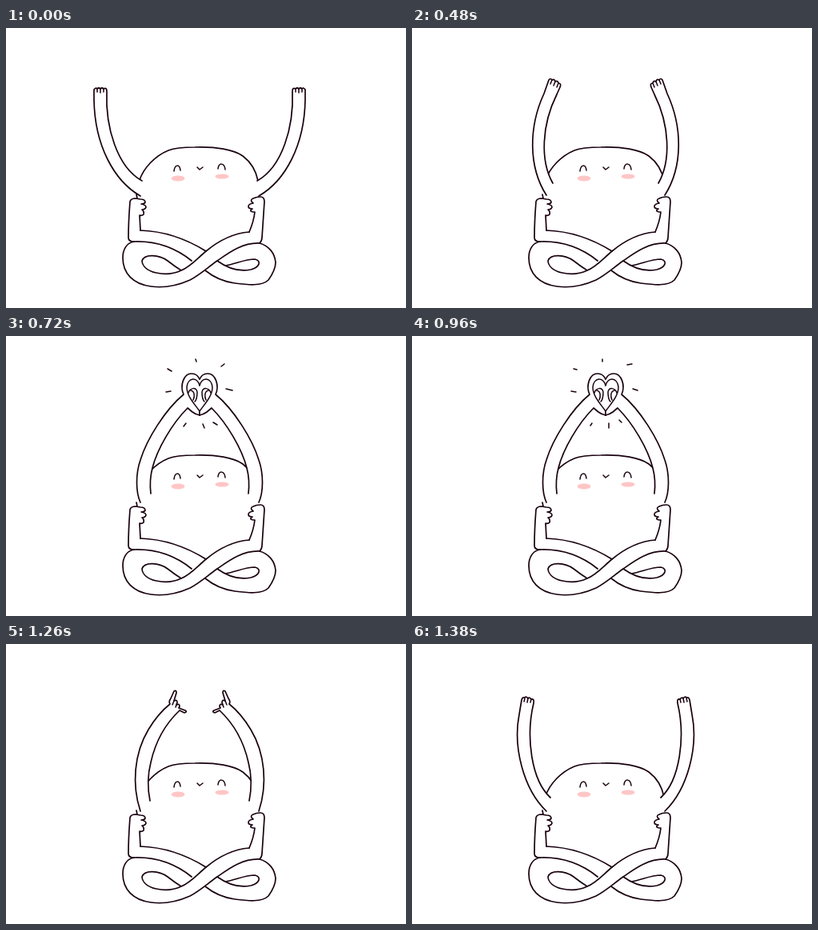
Animation, 500 px wide and 350 px high, one loop 1440 ms. Source, as an HTML page:

```html
<!DOCTYPE html>
<html lang="en">
<head>
<meta charset="utf-8">
<title>Stretch</title>
<style>
  html, body { margin: 0; width: 100%; height: 100%; overflow: hidden; background: #fff; }
  svg { display: block; width: 500px; height: 350px; }
  path { fill: none; stroke: #19000f; stroke-width: 1.7; stroke-linecap: round; stroke-linejoin: round; }
  .skin { fill: #fff; stroke: none; }
  .fine { stroke-width: 1.5; }
  .cheek { fill: #ffc6c6; }
</style>
</head>
<body>
<svg viewBox="0 0 500 350">
  <path d="M167 190C172 175 186 160 203 153C213 149 226 149 236 149C262 148 285 152 296 160C308 169 313 181 315 191"/>
  <ellipse class="cheek" cx="215" cy="188" rx="8.5" ry="3.5"/>
  <ellipse class="cheek" cx="270" cy="185.5" rx="8.5" ry="3.1"/>
  <path class="fine" d="M210 179C211 170 217 170 218 178M265 176C266 168 273 168 274 177M239 174L242 177L246 174"/>

  <g id="arms"></g>
  <path id="rays" class="fine"/>

  <!-- feet -->
  <path d="M160 267Q153 267 153 262C153 246 154 230 155 217Q156 213 162 213L168 214Q174 214 174 218Q173 220 169 220Q175 221 175 224Q174 227 170 227Q173 229 172 233Q170 235 167 234L168 253M163 208L164 213"/>
  <path d="M317 269Q320 266 320 262L323 217Q323 211 318 211Q313 211 309 213Q304 215 309 219Q303 220 303 223Q303 226 308 226Q303 229 309 230H311C310 239 307 248 304 255"/>

  <!-- crossed legs -->
  <path d="M168 253C200 254 226 264 250 279M160 267C188 266 211 274 232 291"/>
  <path d="M304 255C279 257 262 269 250 279C239 288 231 298 219 303C200 312 171 306 170 291C173 282 191 283 202 291Q211 298 219 303"/>
  <path d="M317 269C295 268 277 282 264 291C250 301 243 308 230 315C212 323 195 325 181 323C159 320 146 307 146 287C146 277 151 268 160 267"/>
  <path d="M249 303C260 312 272 317 286 319C302 321 320 323 328 315C333 308 337 300 337 293C336 281 328 272 317 269"/>
  <path d="M264 291C278 301 292 305 306 302C317 299 320 291 311 289C298 289 287 295 274 297"/>
</svg>

<script>
const LOOP = 1440;

// Left arm for each pose: outer edge with hand, inner edge, creases.
// The right arm is its mirror.
const POSES = {
  wide: [
    "M168 210C135 191 111 147 110 90L110 77Q112 74 114 76Q116 74 118 76Q120 74 122 76Q126 74 126 79",
    "126 79C124 124 139 174 170 191",
    "M114 76V80M118 76V81M122 76V80"],
  up: [
    "M168 209C139 181 126 128 134 88L137 70Q138 66 141 67Q143 65 145 68Q147 66 149 69Q153 68 152 74",
    "152 74C142 116 149 170 173 192",
    "M141 68L140 72M145 68L144 73M149 69L148 73"],
  lean: [
    "M168 209C145 173 146 123 165 82L171 65Q173 62 175 65Q178 63 179 67Q182 65 183 69Q187 69 185 74",
    "185 74L181 83C162 121 160 166 176 194",
    "M175 65L173 70M179 67L177 72M183 69L181 74"],
  point: [
    "M168 209C157 176 160 137 178 107C187 92 195 83 205 75Q203 72 206 68L210 59Q213 57 213 61L210 71Q214 69 214 73L213 76Q217 74 217 78L216 80L224 83Q227 85 223 86L217 83",
    "217 83C199 100 187 121 181 148Q175 171 180 196",
    "M210 71L208 76M213 76L212 79"],
  heart: [
    "M168 208C162 195 162 172 168 155C176 129 199 92 222 73C217 62 222 47 232 47Q239 47 242 54",
    "242 99Q237 98 233 95L227 90C208 109 189 141 183 165Q179 180 181 197",
    "M242 62C239 50 227 52 226 64C226 75 235 84 242 94V99M228 71C230 65 238 63 239 70C239 76 238 80 236 82M231 68C236 69 236 76 234 80"]
};

const RAYS = [
  "M202 41L206 42M238 29V32M269 36L275 35M276 66L282 68M199 69L205 70M223 112L225 109M246 109V115M259 105L262 108",
  "M202 41L207 44M237 29L238 32M269 38L273 35M275 66L283 68M200 70L206 69M222 113L225 109M246 110L248 115M259 108L264 111",
  "M202 41L207 43M238 29V32M269 37L274 35M276 66L282 68M200 70H206M222 112L225 109M246 110L247 115M259 107L263 110"
];

// start time, pose, ray drawing
const STEPS = [
  [0, "wide"], [420, "up"], [480, "lean"], [540, "point"],
  [600, "heart", 0], [720, "heart", 1], [840, "heart", 2],
  [960, "heart", 0], [1080, "heart", 1], [1200, "heart", 2],
  [1260, "point"], [1320, "lean"], [1380, "up"]
];

const arms = document.getElementById("arms");
const rays = document.getElementById("rays");

function armPair(name) {
  const [outer, inner, creases] = POSES[name];
  const arm = `<path class="skin" d="${outer}L${inner}"/>
    <path d="${outer}M${inner}"/><path class="fine" d="${creases}"/>`;
  return `${arm}<g transform="matrix(-1 0 0 1 484 0)">${arm}</g>`;
}

let shown = null;
function draw(time) {
  const step = STEPS.findLast(s => s[0] <= time);
  if (step === shown) return;
  shown = step;
  arms.innerHTML = armPair(step[1]);
  rays.setAttribute("d", RAYS[step[2]] || "");
}

const start = performance.now();
function tick() {
  draw((performance.now() - start) % LOOP);
  requestAnimationFrame(tick);
}
tick();
</script>
</body>
</html>
```
